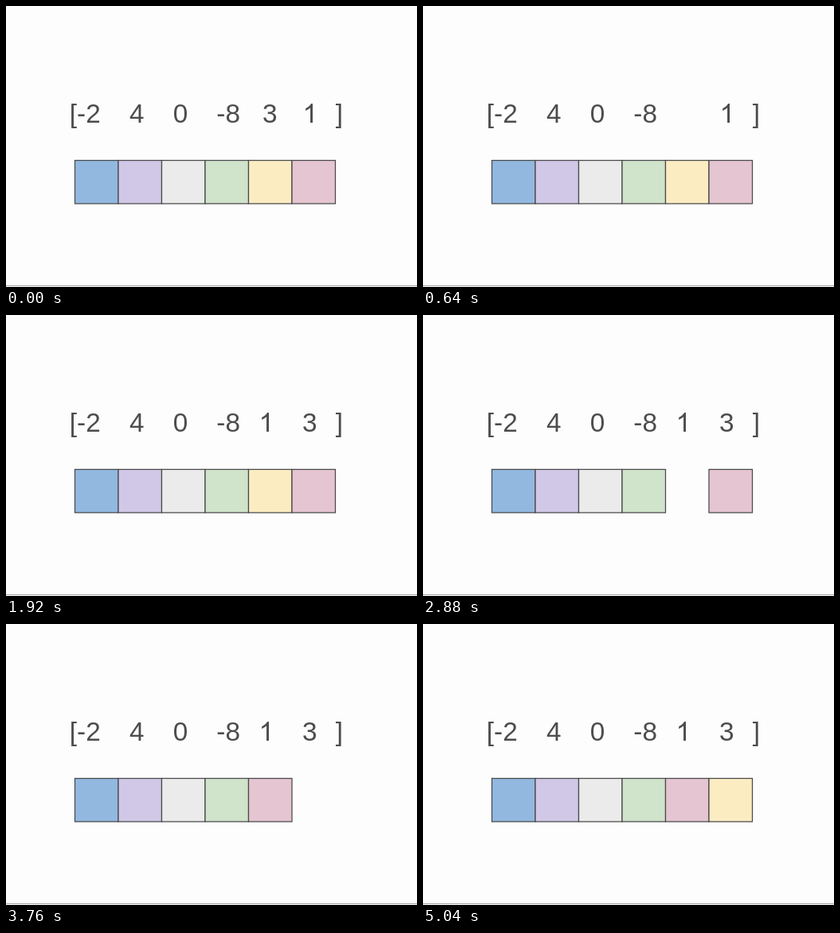
Animation of 516 by 354 pixels, one loop 6.4 s. Source, as an HTML page with a canvas:

```html
<!DOCTYPE html>
<html lang="en">
<head>
<meta charset="utf-8">
<title>Array swap</title>
<style>
html, body { margin: 0; width: 100%; height: 100%; overflow: hidden; background: #fdfdfd; }
canvas { display: block; }
</style>
</head>
<body>
<canvas id="stage" width="516" height="354"></canvas>
<script>
const ctx = document.getElementById('stage').getContext('2d');
const LOOP = 6400;
const SIZE = 33.3, BASE = 147;
const LEFT = 86.5, TOP = 194.5, CELL = 54.5;
const INK = '#4c4c4e';
const YELLOW = '#fcecc2', PINK = '#e5c5d1';
const FIXED = ['#92b8e0', '#d1c8e7', '#ebebeb', '#d0e3cb'];

// A plain "1" without a foot, in 2048 units per em.
const ONE = new Path2D('M763 0H583V1147Q518 1085 412 1023T223 930V1104Q374 1175 487 1276T647 1472H763Z');

function text(s, x) {
  ctx.fillText(s, x, BASE);
}

function one(x) {
  ctx.save();
  ctx.translate(x, BASE);
  ctx.scale(SIZE / 2048, -SIZE / 2048);
  ctx.fill(ONE);
  ctx.restore();
}

function cell(i, color) {
  const x = LEFT + i * CELL;
  ctx.fillStyle = color;
  ctx.fillRect(x, TOP, CELL, CELL);
  ctx.strokeRect(x, TOP, CELL, CELL);
}

function draw(t) {
  ctx.fillStyle = '#fdfdfd';
  ctx.fillRect(0, 0, 516, 354);
  ctx.fillStyle = '#a0a0a0';
  ctx.fillRect(0, 352, 516, 1);

  ctx.fillStyle = INK;
  ctx.font = SIZE + 'px "Liberation Sans", Arial, sans-serif';
  text('[-2', 79.8);
  text('4', 155);
  text('0', 209.8);
  text('-8', 264.3);
  text(']', 413.8);

  // Swap the last two numbers.
  if (t < 640) text('3', 321.9);
  if (t < 1040) one(372.6);
  if (t >= 1440) one(317.6);
  if (t >= 1920) text('3', 372);

  // Swap their cells in the same way.
  ctx.strokeStyle = '#48484a';
  ctx.lineWidth = 1.25;
  FIXED.forEach((color, i) => cell(i, color));
  if (t < 2880) cell(4, YELLOW);
  if (t < 3200) cell(5, PINK);
  if (t >= 3760) cell(4, PINK);
  if (t >= 4160) cell(5, YELLOW);
}

const start = performance.now();
function tick() {
  draw((performance.now() - start) % LOOP);
  requestAnimationFrame(tick);
}
tick();
</script>
</body>
</html>
```
